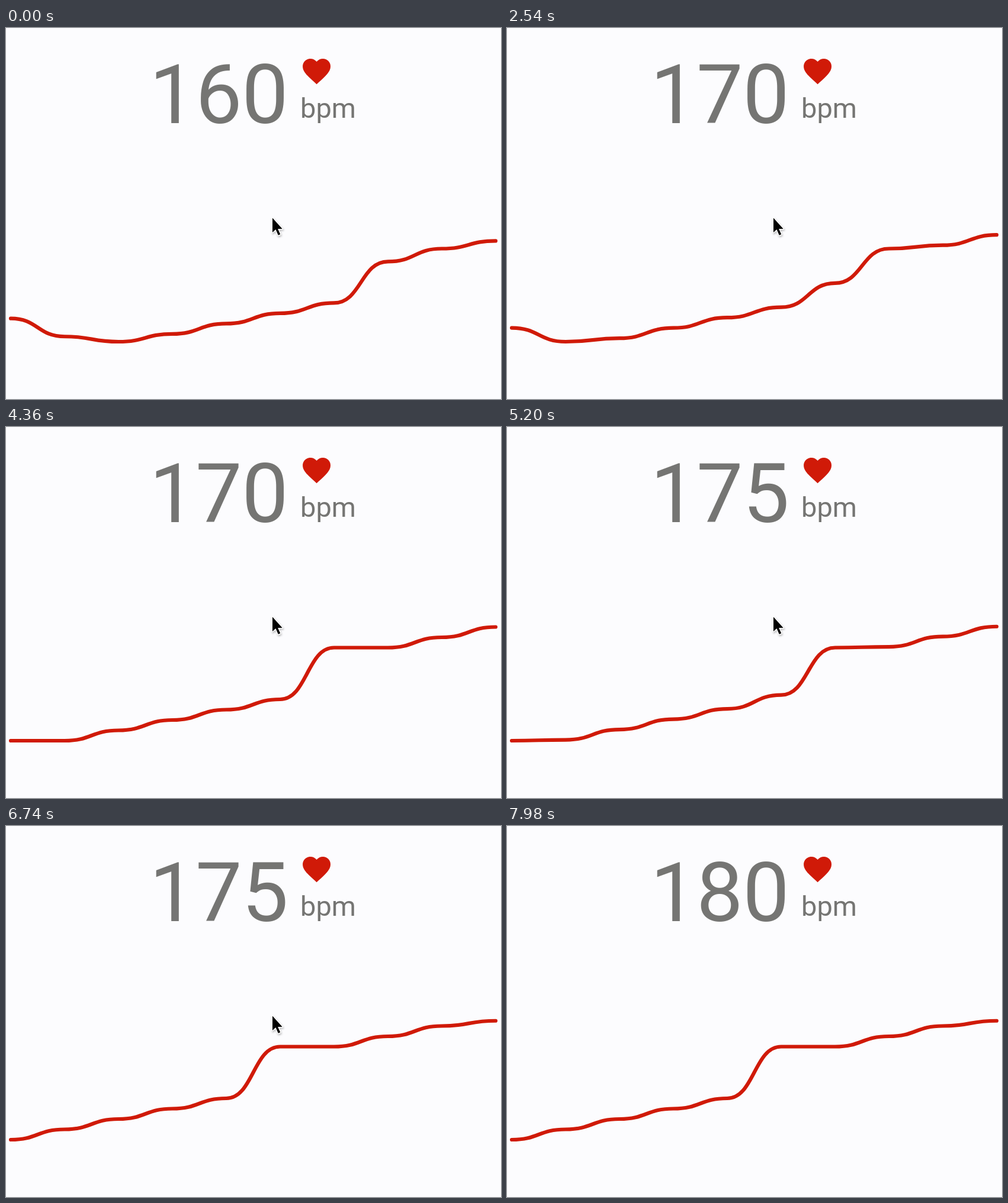
Recreate the animation shown at these times as an HTML page. Size 836 px wide and 628 px high, loop 8 s.

```html
<!DOCTYPE html>
<html lang="en">
<head>
<meta charset="utf-8">
<title>Heart rate</title>
<style>
  html, body { margin: 0; width: 100%; height: 100%; overflow: hidden; background: #fcfcfe; }
  svg { display: block; width: 836px; height: 628px; }
  text { font-family: Roboto, sans-serif; fill: #757573; }
  #rate { font-size: 140px; letter-spacing: -0.6px; }
  #unit { font-size: 47px; }
  #line { fill: none; stroke: #d01a08; stroke-width: 6.2; stroke-linecap: round; stroke-linejoin: round; }
  #heart { fill: #d01a08; }
  #cursor { filter: drop-shadow(1px 2px 1.5px rgba(0, 0, 0, .25)); }
</style>
</head>
<body>
<svg viewBox="0 0 836 628">
  <text id="rate" x="242" y="160.5">160</text>
  <path id="heart" transform="translate(496.4 45) scale(2.35)"
    d="M12 21.35l-1.45-1.32C5.4 15.36 2 12.28 2 8.5 2 5.42 4.42 3 7.5 3c1.74 0 3.41.81 4.5 2.09C13.09 3.81 14.76 3 16.5 3 19.58 3 22 5.42 22 8.5c0 3.78-3.4 6.86-8.55 11.54z"/>
  <text id="unit" x="497" y="152">bpm</text>
  <path id="line"/>
  <path id="cursor" stroke="#fff" stroke-width="3" paint-order="stroke" stroke-linejoin="round"
    d="M450 321.5V346l5.5-5 4.2 9.8 3.6-1.5-4.2-9.3h7.6z"/>
</svg>
<script>
  const LOOP = 8000;
  const CURSOR_HIDES_AT = 7360;
  const readings = [90, 80, 60, 60, 70, 80, 90, 100, 150, 150, 160, 170, 175, 180];
  const VISIBLE = 10, STEPS_PER_READING = 60, MORPH_STEPS = 12;
  const LEFT = 8, SPACING = 91;

  const rate = document.getElementById('rate');
  const line = document.getElementById('line');
  const cursor = document.getElementById('cursor');

  const toY = bpm => 636 - 1.75 * bpm;

  // Motion advances in uneven ticks of 20, 20 and 100 ms.
  function tickAt(time) {
    const shifted = time + 20;
    const rest = shifted % 140;
    return 3 * Math.floor(shifted / 140) + Math.min(2, Math.floor(rest / 20));
  }

  function curve(values) {
    let path = `M${LEFT} ${toY(values[0])}`;
    for (let i = 1; i < values.length; i++) {
      const x = LEFT + i * SPACING, mid = x - SPACING / 2;
      const y0 = toY(values[i - 1]), y1 = toY(values[i]);
      path += `C${mid} ${y0} ${mid} ${y1} ${x} ${y1}`;
    }
    return path;
  }

  function draw(time) {
    const step = tickAt(time) + 8;
    const start = Math.floor(step / STEPS_PER_READING);
    const progress = Math.min(1, (step % STEPS_PER_READING) / MORPH_STEPS);
    const values = Array.from({ length: VISIBLE }, (_, i) => {
      const from = readings[start + i], to = readings[start + i + 1];
      return from + (to - from) * progress;
    });
    line.setAttribute('d', curve(values));
    rate.textContent = readings[start + VISIBLE];
    cursor.style.visibility = time < CURSOR_HIDES_AT ? 'visible' : 'hidden';
  }

  function play() {
    draw(performance.now() % LOOP);
    requestAnimationFrame(play);
  }
  play();
</script>
</body>
</html>
```
